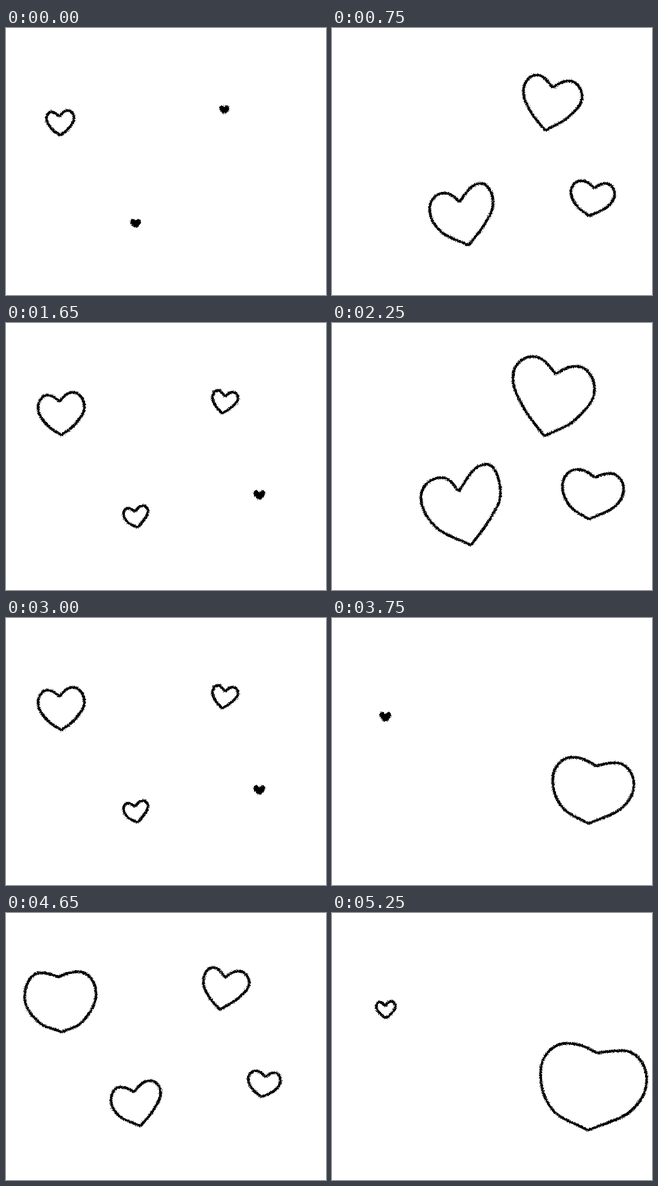
These frames come from a looping animation (600 by 500 pixels, 5400 ms). An HTML page:

```html
<!DOCTYPE html>
<html lang="en">
<head>
<meta charset="utf-8">
<title>Hearts</title>
<style>
  html, body { margin: 0; width: 100%; height: 100%; overflow: hidden; background: #fff; }
  svg { display: block; width: 600px; height: 500px; }
  path { stroke: #000; stroke-linejoin: round; }
</style>
</head>
<body>
<svg viewBox="0 0 600 500">
  <filter id="crayon" filterUnits="userSpaceOnUse" x="0" y="0" width="600" height="500" color-interpolation-filters="sRGB">
    <feTurbulence type="fractalNoise" baseFrequency=".55" numOctaves="2" seed="4" result="grain"/>
    <feDisplacementMap in="SourceGraphic" in2="grain" scale="6" xChannelSelector="R" yChannelSelector="G"/>
  </filter>
  <g id="hearts" filter="url(#crayon)"></g>
</svg>
<script>
const STEP = 150, CYCLE = 9, LIFE = 7;

// Pose points: notch, tip, then top, side and lower point of the left and right half.
const BUD = [[0, 0], [0, 7], [-6, -6], [-8, -3], [-4, 3], [6, -6], [8, -3], [4, 3]];

// start: first step shown; bud: centre and scale; size: 0 = bud, 1 = mid, 2 = big
const hearts = [
  {
    start: 7, bud: [100, 185, 1], size: [0, .28, .5, .75, 1, 1.5, 2],
    mid: [[100, 147], [104, 210], [77, 135], [60, 160], [78, 192], [125, 130], [147, 157], [130, 189]],
    big: [[98, 120], [105, 223], [64, 112], [35, 158], [61, 204], [136, 110], [169, 152], [144, 203]]
  },
  {
    start: 0, bud: [409.5, 153, .8], size: [0, .25, .48, .75, 1, 2, 3.8],
    mid: [[411, 121], [401, 181], [388, 102], [370, 129], [382, 159], [436, 109], [456, 131], [436, 159]],
    big: [[414, 112], [400, 192], [384, 88], [359, 119], [374, 159], [444, 99], [469, 129], [443, 167]]
  },
  {
    start: 0, bud: [243, 366, .9], size: [0, .2, .4, .7, 1, 2, 3.15],
    mid: [[240, 335], [252, 399], [214, 326], [197, 350], [212, 380], [270, 314], [290, 336], [275, 371]],
    big: [[239, 326], [256, 407], [210, 309], [183, 339], [204, 381], [279, 291], [302, 328], [285, 369]]
  },
  {
    start: 2, bud: [475, 322, 1], size: [0, .35, .68, 1, 1.28, 1.6, 2],
    mid: [[492, 300], [482, 352], [467, 286], [448, 308], [460, 334], [513, 291], [530, 312], [516, 335]],
    big: [[497, 262], [480, 407], [440, 244], [391, 300], [414, 369], [545, 258], [590, 312], [560, 371]]
  }
];

const mix = (a, b, kx, ky = kx) => [a[0] + (b[0] - a[0]) * kx, a[1] + (b[1] - a[1]) * ky];
const mixPose = (p, q, k) => p.map((a, i) => mix(a, q[i], k));

function half(notch, tip, top, side, low) {
  const bend = [(tip[0] - side[0]) * .17, (tip[1] - side[1]) * .17];
  return "M" + notch +
    "C" + [mix(notch, top, .3, .5), mix(top, notch, .45, 0), top] +
    "C" + [mix(top, side, .55, 0), mix(side, top, 0, .55), side] +
    "C" + [mix(side, low, 0, .4), [low[0] - bend[0], low[1] - bend[1]], low] +
    "C" + [[low[0] + bend[0], low[1] + bend[1]], mix(tip, low, .33), tip];
}

const layer = document.getElementById("hearts");
for (const heart of hearts) {
  const [x, y, k] = heart.bud;
  heart.small = BUD.map(p => [x + p[0] * k, y + p[1] * k]);
  heart.path = document.createElementNS("http://www.w3.org/2000/svg", "path");
  layer.append(heart.path);
}

let shown = -1;
function draw() {
  const step = Math.floor(performance.now() / STEP) % CYCLE;
  if (step !== shown) {
    shown = step;
    for (const { start, size, small, mid, big, path } of hearts) {
      const age = (step - start + CYCLE) % CYCLE;
      if (age >= LIFE) {
        path.setAttribute("d", "");
        continue;
      }
      const s = size[age];
      const [notch, tip, ...sides] = s < 1 ? mixPose(small, mid, s) : mixPose(mid, big, s - 1);
      path.setAttribute("d", half(notch, tip, ...sides.slice(0, 3)) + half(notch, tip, ...sides.slice(3)));
      path.setAttribute("fill", age ? "none" : "#000");
      path.setAttribute("stroke-width", age ? 5 : 6);
    }
  }
  requestAnimationFrame(draw);
}
draw();
</script>
</body>
</html>
```
